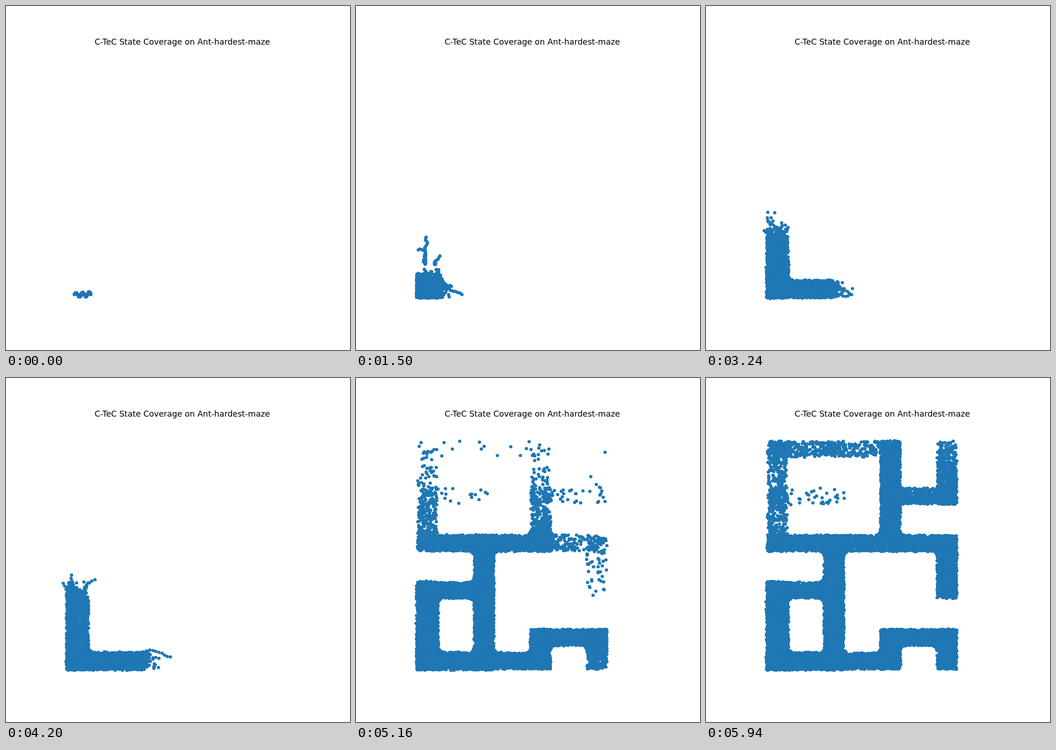
These frames come from a looping animation (748x748 px, 6000 ms). An HTML page with a canvas:

```html
<!DOCTYPE html>
<html lang="en">
<head>
<meta charset="utf-8">
<title>State coverage</title>
<style>
  html, body { margin: 0; width: 100%; height: 100%; overflow: hidden; background: #fff; }
  canvas { display: block; }
</style>
</head>
<body>
<canvas id="stage" width="748" height="748"></canvas>
<script>
const LOOP = 6000, STEP = 60, BLUE = '#1f77b4', DENSE = 0.22;
const ORIGIN = { x: 155, y: 615 }, PITCH = { x: 61.4, y: 51.25 }, HALF = { x: 21, y: 17 };
const DIRS = { U: [0, -1], D: [0, 1], L: [-1, 0], R: [1, 0] };
const OPPOSITE = { U: 'D', D: 'U', L: 'R', R: 'L' };
const ctx = document.getElementById('stage').getContext('2d');

const marker = document.createElement('canvas');
marker.width = marker.height = 9;
const pen = marker.getContext('2d');
pen.fillStyle = BLUE;
pen.arc(4.5, 4.5, 3.6, 0, 7);
pen.fill();

let seed = 1;
function rnd() {
  seed = (seed + 0x6D2B79F5) | 0;
  let z = Math.imul(seed ^ (seed >>> 15), 1 | seed);
  z = (z + Math.imul(z ^ (z >>> 7), 61 | z)) ^ z;
  return ((z ^ (z >>> 14)) >>> 0) / 4294967296;
}
const jitter = size => (rnd() - rnd()) * size;
const clamp = (v, lo, hi) => Math.max(lo, Math.min(hi, v));
const ease = u => { u = clamp(u, 0, 1); return u * u * (3 - 2 * u); };
const dot = (x, y) => ctx.drawImage(marker, Math.round(x) - 4, Math.round(y) - 4);

// Corridors near the start are worn a little wider
const worn = d => 1 + 0.12 * Math.exp(-d / 60);

// The maze is a tree of straight runs; d is the walking distance from the start
const runs = [], cells = new Map();

function join(node, dir, d) {
  const key = [node.x, node.y].map(Math.round).join();
  if (!cells.has(key)) cells.set(key, { x: node.x, y: node.y, arms: {} });
  cells.get(key).arms[dir] = d;
}

function dig(node, dir, count, lag = 0, density = DENSE) {
  const [dx, dy] = DIRS[dir];
  const length = count * (dx ? PITCH.x : PITCH.y), d = node.d + lag;
  const end = { x: node.x + dx * length, y: node.y + dy * length, d: d + length };
  runs.push({ x: node.x, y: node.y, dx, dy, length, d, density });
  if (density === DENSE) {
    join(node, dir, d);
    join(end, OPPOSITE[dir], end.d);
  }
  return end;
}

function digMaze() {
  const start = { ...ORIGIN, d: 0 };
  const loop = dig(dig(start, 'U', 3), 'R', 2);
  const hub = dig(loop, 'U', 2);
  const south = dig(start, 'R', 2);
  dig(loop, 'D', 1.5, 60);
  dig(south, 'U', 1.5, 184);
  const exit = dig(dig(dig(south, 'R', 2), 'U', 1), 'R', 2);
  dig(exit, 'D', 1, 30);

  const west = dig(dig(hub, 'L', 2), 'U', 2, 0, 0.05);
  dig(west, 'R', 2, 0, 0.008);
  dig(dig(west, 'U', 2, 0, 0.05), 'R', 2, 0, 0.05);

  const middle = dig(hub, 'R', 2);
  dig(dig(middle, 'R', 2), 'D', 2, -30);
  const north = dig(middle, 'U', 2);
  dig(dig(north, 'U', 2), 'L', 2, 0, 0.04);
  dig(dig(north, 'R', 2, 0, 0.12), 'U', 2);
}

// Full density behind the front, fading exponentially ahead of it
function fillRun(run, front, tail) {
  const { x, y, dx, dy, length, d, density } = run;
  const [along, across] = dx ? [HALF.x, HALF.y] : [HALF.y, HALF.x];
  const a = along * worn(d), b = across * worn(d);
  for (let i = (length + 2 * a) * 2 * b * density; i > 0; i--) {
    const s = -a + rnd() * (length + 2 * a);
    if (rnd() * density > DENSE * Math.exp((front - d - s) / tail)) continue;
    const u = s + jitter(2), v = (rnd() * 2 - 1) * b + jitter(2);
    dot(x + dx * u + dy * v, y + dy * u + dx * v);
  }
}

// Round the inner corners wherever two arms of a cell meet
function fillCorners(cell, front, tail) {
  for (const h of 'LR') for (const v of 'UD') {
    if (!(h in cell.arms && v in cell.arms)) continue;
    const d = Math.max(cell.arms[h], cell.arms[v]) + 25;
    const sx = DIRS[h][0], sy = DIRS[v][1], w = worn(d - 25);
    for (let i = 0; i < 100; i++) {
      const p = rnd(), q = rnd();
      if (Math.hypot(1 - p, 1 - q) < 1 || rnd() > Math.exp((front - d) / tail)) continue;
      dot(cell.x + sx * (HALF.x * w + p * 14), cell.y + sy * (HALF.y * w + q * 14));
    }
  }
}

function firstPath() {
  for (let u = 0; u <= 1; u += 0.012)
    dot(148 + 36 * u + jitter(1.5), 627 - (3 + 3 * u) * Math.sin(5 * Math.PI * u) + jitter(1.5));
}

function wander(x, y, heading, steps, stride, turn, top = 0, left = 0, right = 748) {
  for (let i = 0; i < steps; i++) {
    heading += jitter(turn);
    x = clamp(x + stride * Math.cos(heading), left, right);
    y = clamp(y + stride * Math.sin(heading), top, 633);
    dot(x, y);
  }
}

// One more random walk around the start per frame
function earlyWalks(frame) {
  seed = 5;
  firstPath();
  for (let id = 1; id <= Math.min(frame, 30); id++) {
    seed = id * 7919;
    const top = 550 + rnd() * 50;
    wander(142 + rnd() * 38, 612 + rnd() * 20, rnd() * 6.28, 70, 1.8, 0.9,
      top, 132, 172 + (top - 550) * 0.32);
  }
}

// Thin trails running ahead of both fronts
function stragglers(now, front) {
  const stride = 2 + now / 850, steps = 70 / stride;
  seed = 40 + Math.floor(now / 480);
  for (let i = 0; i < 4; i++) {
    wander(155 + jitter(20), ORIGIN.y - Math.max(front, now / 30), -1.57 + jitter(0.4), steps * rnd(), stride, 0.9);
    wander(ORIGIN.x + front, 612 + jitter(16), jitter(0.5), steps * rnd(), stride, 0.9);
  }
}

function draw(frame) {
  const now = frame * STEP;
  const front = -30 + 168 * ease(now / 4200) + 590 * ease((now - 4300) / 1600);
  const tail = 7 + 53 * clamp((now - 4200) / 600, 0, 1);
  ctx.fillStyle = '#fff';
  ctx.fillRect(0, 0, 748, 748);
  ctx.fillStyle = '#000';
  ctx.font = '17.64px "DejaVu Sans", sans-serif';
  ctx.textAlign = 'center';
  ctx.fillText('C-TeC State Coverage on Ant-hardest-maze', 383.5, 84);
  if (now < 2400) earlyWalks(frame);
  if (now > 480 && now < 4300) stragglers(now, front);
  if (now < 480) return;
  seed = frame * 104729 + 17;
  for (const run of runs) fillRun(run, front, tail);
  for (const cell of cells.values()) fillCorners(cell, front, tail);
}

let shown = -1;
function tick() {
  const frame = Math.floor(performance.now() % LOOP / STEP);
  if (frame !== shown) draw(shown = frame);
  requestAnimationFrame(tick);
}
digMaze();
tick();
</script>
</body>
</html>
```
